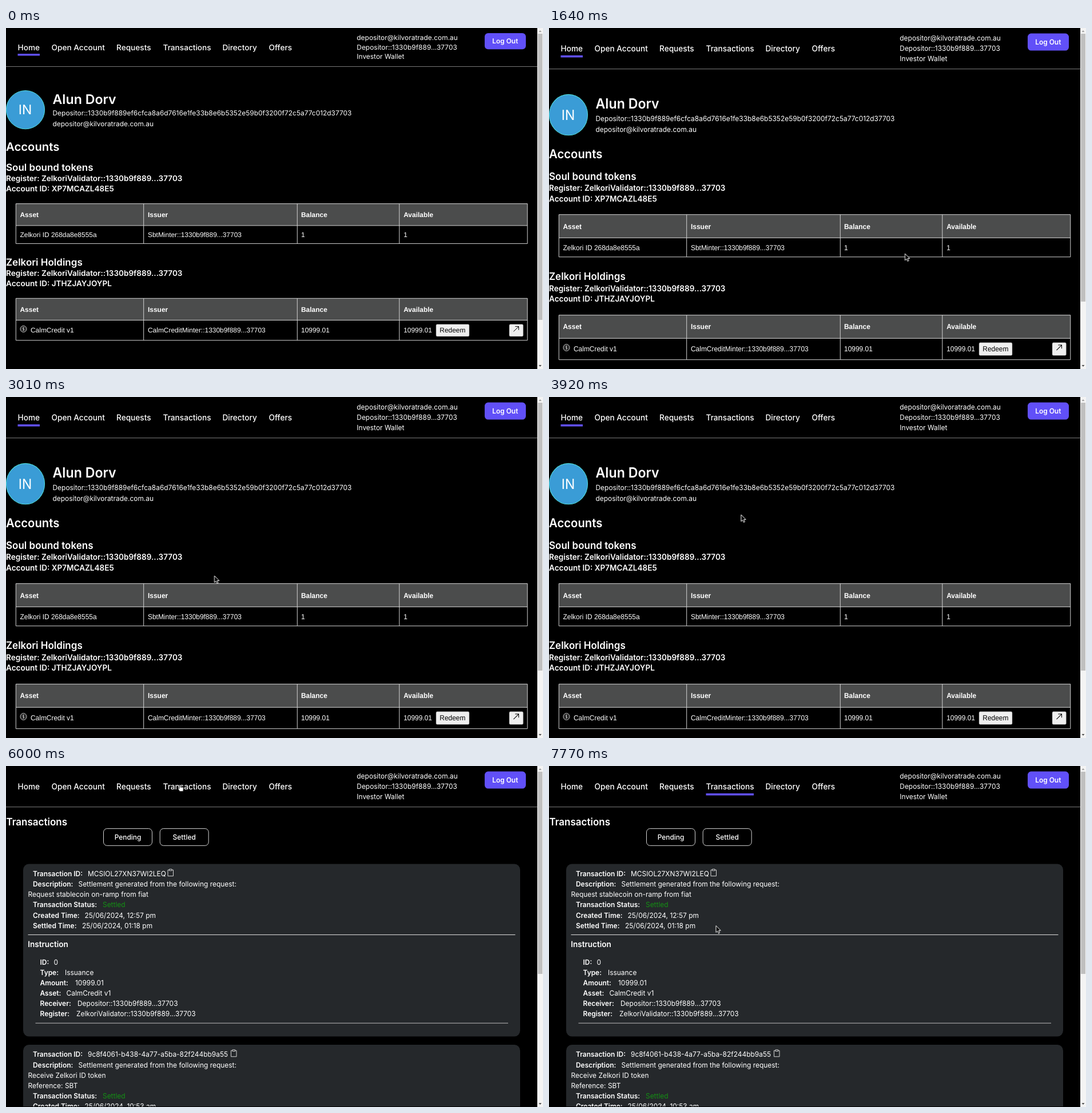
An HTML page for the animation above (8000 ms loop, 939 by 597 pixels).

```html
<!DOCTYPE html>
<html lang="en">
<head>
<meta charset="utf-8">
<title>Wallet</title>
<style>
html, body { margin: 0; width: 100%; height: 100%; overflow: hidden; background: #000; }
svg { display: block; width: 939px; height: 597px; }
text { font: 400 11.95px Inter, sans-serif; fill: #fff; text-rendering: geometricPrecision; white-space: pre; }
.nav { font-size: 13.65px; font-weight: 500; }
.b { font-weight: 600; }
.m { font-weight: 500; }
.h1 { font-size: 23.2px; font-weight: 600; }
.h2 { font-size: 20.3px; font-weight: 600; }
.h3 { font-size: 17px; font-weight: 600; }
.h4 { font-size: 13.55px; font-weight: 600; }
.ini { font-size: 23px; }
.mid { text-anchor: middle; }
.ok { fill: #149014; }
.cell, .th { font-family: "Liberation Sans", Arial, sans-serif; }
.th { font-weight: 700; }
.dark { fill: #000; }
.accent { fill: #6150f8; }
.line { fill: none; stroke: #d4d4d4; vector-effect: non-scaling-stroke; }
.card { fill: #25282b; }

/* 1% of the loop is 80 ms */
#view, .home, .deals, #arrow, #hand, .on { animation: 8s step-end infinite; }
#view { animation-name: stretch; }
@keyframes stretch { 0% { transform: none; } .375%, 100% { transform: scaleY(1.062); } }
.home { animation-name: home; }
@keyframes home { 0% { visibility: visible; } 74.5%, 100% { visibility: hidden; } }
.deals { animation-name: deals; }
@keyframes deals { 0% { visibility: hidden; } 74.5%, 100% { visibility: visible; } }
.on { animation-name: on; }
@keyframes on { 0% { visibility: hidden; } 84.5%, 100% { visibility: visible; } }
#thumb { animation: thumb 8s step-end infinite; }
@keyframes thumb { 0% { height: 501px; } .375% { height: 469px; } 74.5%, 100% { height: 354px; } }
#arrow { animation-name: arrow; }
@keyframes arrow { 0% { visibility: visible; } 61% { visibility: hidden; } 84.5%, 100% { visibility: visible; } }
#hand { animation-name: hand; }
@keyframes hand { 0% { visibility: hidden; } 61% { visibility: visible; } 84.5%, 100% { visibility: hidden; } }
#cursor { animation: move 8s ease-in-out infinite; }
@keyframes move {
  0%, 6.125% { transform: translate(680px, 602px); }
  7.75%, 22.5% { transform: translate(622.5px, 395px); }
  25.875%, 33.75% { transform: translate(500px, 360px); }
  37.625%, 40.25% { transform: translate(364.5px, 313px); }
  43.625%, 47.5% { transform: translate(346px, 250px); }
  50%, 53.125% { transform: translate(331px, 185px); }
  56.875%, 58.75% { transform: translate(318px, 105px); }
  61.75%, 83.375% { transform: translate(304.5px, 33px); }
  88.75%, 94.25% { transform: translate(298px, 185px); }
  97.125%, 100% { transform: translate(292px, 279.5px); }
}
</style>
</head>
<body>
<svg viewBox="0 0 939 597">
  <g id="view"></g>
  <rect y="596" width="929" height="1"/>
  <rect x="929" width="10" height="597" fill="#f4f4f4"/>
  <rect id="thumb" x="930" y="10" width="8" height="501" fill="#c0c0c0"/>
  <path d="M931.5 7L934 4L936.5 7Z" fill="#a0a0a0"/>
  <path d="M931.5 590L934 593L936.5 590Z" fill="#505050"/>
  <g id="cursor">
    <path id="arrow" d="M0 0V11.8L2.7 9.3L4.5 13.4L6.5 12.5L4.7 8.6H8.3Z" fill="#000" stroke="#fff" stroke-linejoin="round"/>
    <path id="hand" d="M-1.6 .3Q-.3 -1 .6 .5V4L5.2 5Q6.2 5.4 6 6.8L5.2 11.4H-.8L-3.8 6.8Q-3.6 5.2 -1.6 6.4Z" fill="#fff" stroke="#000" stroke-width=".8"/>
  </g>
</svg>
<script>
const HASH = "::1330b9f889";
const party = name => name + HASH + "...37703";
const MAIL = "depositor@kilvoratrade.com.au";

const text = (x, y, s, cls = "") => `<text x="${x}" y="${y}" class="${cls}">${s}</text>`;
const rect = (x, y, w, h, attrs) => `<rect x="${x}" y="${y}" width="${w}" height="${h}" ${attrs}/>`;
const group = (cls, ...parts) => `<g class="${cls}">${parts.join("")}</g>`;

function header() {
  const links = { Home: 20.5, "Open Account": 79.5, Requests: 193, Transactions: 274.5, Directory: 378.5, Offers: 459.5 };
  return Object.entries(links).map(([s, x]) => text(x, 38.6, s, "nav")).join("")
    + [MAIL, party("Depositor"), "Investor Wallet"].map((s, i) => text(613.3, 20.6 + i * 16.9, s)).join("")
    + rect(837, 9, 72, 28.3, 'rx="6" class="accent"')
    + text(872.8, 27.2, "Log Out", "b mid")
    + rect(0, 67, 929, 1, 'fill="#777"');
}

function table(top, bottom, cells, hasIcon) {
  const xs = [24.5, 248, 516, 695.2];
  const head = top + 38.3;
  const rowY = (head + bottom) / 2 + 4.2;
  return rect(17.3, top, 894.5, 38.3, 'fill="#4b4c4c"')
    + `<path class="line" d="M17.3 ${top}H911.8V${bottom}H17.3ZM17.3 ${head}H911.8M240.7 ${top}V${bottom}M509.3 ${top}V${bottom}M687.8 ${top}V${bottom}"/>`
    + xs.map((x, i) => text(x, top + 23.4, ["Asset", "Issuer", "Balance", "Available"][i], "th")).join("")
    + cells.map((s, i) => text(hasIcon && !i ? 43 : xs[i], rowY, s, "cell")).join("");
}

function section(y, title, id) {
  return text(0, y, title, "h3")
    + text(0, y + 18.2, "Register: " + party("ZelkoriValidator"), "h4")
    + text(0, y + 35.9, "Account ID: " + id, "h4");
}

function home() {
  const full = "Depositor" + HASH + "ef6cfca8a6d7616e1fe33b8e6b5352e59b0f3200f72c5a77c012d37703";
  const button = (x, w) => rect(x, 518.7, w, 21.2, 'rx="2" fill="#efefef" stroke="#777" stroke-width=".5"');
  return group("home",
    rect(20.5, 45.1, 38.5, 3.4, 'class="accent"'),
    '<circle cx="34" cy="143.2" r="33.6" fill="#3a9cd6" stroke="#50dcdc"/>',
    text(33.6, 151.3, "IN", "ini mid"),
    text(81.5, 132.9, "Alun Dorv", "h1"),
    text(81.5, 153.4, full),
    text(81.5, 171.5, MAIL),
    text(0, 214.6, "Accounts", "h2"),
    section(250, "Soul bound tokens", "XP7MCAZL48E5"),
    table(307.6, 377.4, ["Zelkori ID 268da8e8555a", party("SbtMinter"), "1", "1"]),
    section(415.6, "Zelkori Holdings", "JTHZJAYJOYPL"),
    table(473.3, 546.8, ["CalmCredit v1", party("CalmCreditMinter"), "10999.01", "10999.01"], true),
    '<circle cx="30.5" cy="526.9" r="5.5" class="line"/><circle cx="30.5" cy="526.9" r="3.8" fill="none" stroke="#999" stroke-width=".6"/>',
    '<path d="M32 525.3Q30.5 523.9 29.2 525.3T30.5 526.9T31.8 528.5T29 528.5M30.5 523.8V530" class="line" stroke-width=".8"/>',
    button(752, 58),
    text(780.9, 533.4, "Redeem", "cell dark mid"),
    button(880, 24.4),
    '<path d="M887.5 531.3L896.3 522.9M890.3 522.6H896.5V528.6" fill="none" stroke="#000"/>');
}

const STEP = 17.07;
// Each row is [label, label x, value, value x, value class]
const rows = (y, list) => list.map(([label, lx, val, vx, cls], i) =>
  text(lx, y + i * STEP, label, val ? "b" : "") + (val ? text(vx, y + i * STEP, val, cls) : "")).join("");

const clip = (x, y) => `<path class="line" d="M${x + 3} ${y + 1.5}H${x + .5}V${y + 11.5}H${x + 10}V${y + 1.5}H${x + 7.5}M${x + 3} ${y + .2}H${x + 7.5}V${y + 2.6}H${x + 3}Z"/>`;

const intro = id => [
  ["Transaction ID:", 47, id, 143],
  ["Description:", 47, "Settlement generated from the following request:", 126.5]];
const settled = ["Transaction Status:", 47, "Settled", 169, "ok"];

function deals() {
  const button = (x, s) => rect(x, 103.2, 85, 28, 'rx="6" class="line"') + text(x + 42.5, 121.5, s, "m mid");
  return group("deals",
    group("on", rect(274.5, 45.1, 83.5, 3.4, 'class="accent"')),
    text(0.5, 97.5, "Transactions", "h3"),
    button(170.5, "Pending"), button(269.2, "Settled"),
    rect(30, 161.4, 869, 284.5, 'rx="10" class="card"'),
    rows(181.8, [...intro("MCSIOL27XN37WI2LEQ"),
      ["Request stablecoin on-ramp from fiat", 38.5],
      settled,
      ["Created Time:", 47, "25/06/2024, 12:57 pm", 137.5],
      ["Settled Time:", 47, "25/06/2024, 01:18 pm", 133]]),
    clip(282.5, 169.9),
    rect(38.5, 277.7, 852, 1, 'fill="#d8d8d8"'),
    text(38.2, 298.1, "Instruction", "h4"),
    rows(327.4, [["ID:", 59.5, "0", 83.5],
      ["Type:", 59.5, "Issuance", 103],
      ["Amount:", 59.5, "10999.01", 121],
      ["Asset:", 59.5, "CalmCredit v1", 105.5],
      ["Receiver:", 59.5, party("Depositor"), 125],
      ["Register:", 59.5, party("ZelkoriValidator"), 123]]),
    rect(51.5, 423.4, 826.5, 1, 'fill="#b4b4b4"'),
    rect(30, 459.5, 869, 200, 'rx="10" class="card"'),
    rows(479.7, [...intro("9c8f4061-b438-4a77-a5ba-82f244bb9a55"),
      ["Receive Zelkori ID token", 38.5],
      ["Reference: SBT", 38.5],
      settled,
      ["Created Time:", 47, "25/06/2024, 10:53 am", 137.5]]),
    clip(393, 467.6));
}

document.getElementById("view").innerHTML = header() + home() + deals();
</script>
</body>
</html>
```
